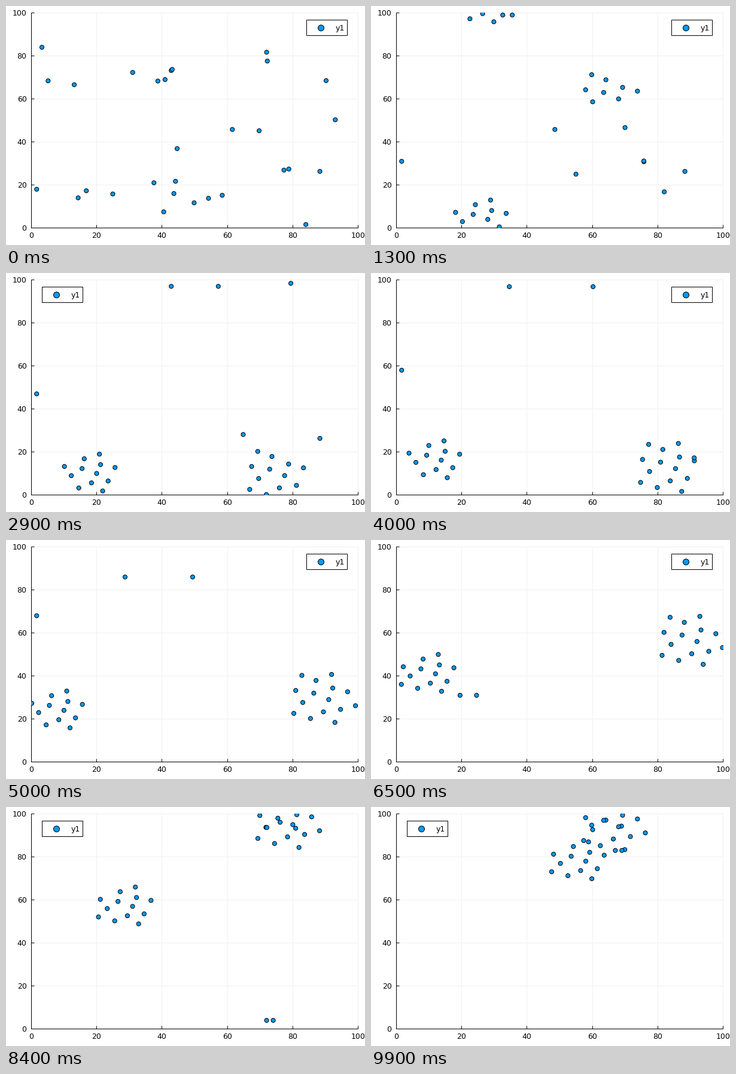
Write a matplotlib script that moves like this. It is 600 px wide and 400 px high and loops after 10 s.

```python
import numpy as np
import matplotlib.pyplot as plt
from matplotlib.animation import FuncAnimation
from matplotlib.patches import Circle, Rectangle

W, H, DPI = 600, 400, 100
FRAMES, INTERVAL = 100, 100
PX = 72 / DPI  # one pixel in points
LEFT, RIGHT, TOP, BOTTOM = 42.5, 588.5, 11.5, 371.5
BLUE = "#009afa"

plt.rcParams["font.family"] = "DejaVu Sans"
plt.rcParams["font.size"] = 9

# Steps at which the flock centres pass their key points
T = np.array([13, 29, 50, 65, 84, 99], float)


def path(points):
    """Smooth curve through one key point per time in T."""
    p = np.array(points, float)
    v = np.gradient(p, T, axis=0)

    def at(t):
        t = np.clip(t, T[0], T[-1])
        i = min(np.searchsorted(T, t, side="right") - 1, len(T) - 2)
        h = T[i + 1] - T[i]
        s = (t - T[i]) / h
        return ((1 + 2 * s) * (1 - s) ** 2 * p[i]
                + s * (1 - s) ** 2 * h * v[i]
                + s * s * (3 - 2 * s) * p[i + 1]
                + s * s * (s - 1) * h * v[i + 1])
    return at


def disc(n):
    """n evenly spread slots in the unit disc."""
    k = np.arange(n)
    r = np.sqrt((k + 0.5) / n)
    return np.column_stack([r * np.cos(2.4 * k), r * np.sin(2.4 * k)])


def birds(points, vel=(0, 0), join=(0, 13)):
    """Rows of x, y, vx, vy, first and last step of joining the flock."""
    return [(*p, *vel, *join) for p in points]


def flock(centre, slots, spread, members):
    m = np.array(members, float)
    start, vel, t0, t1 = m[:, :2], m[:, 2:4], m[:, 4:5], m[:, 5:6]

    def at(t):
        s = np.clip((t - t0) / (t1 - t0), 0, 1)
        s = s * s * (3 - 2 * s)
        goal = centre(t) + slots * spread(t)
        return (1 - s) * (start + vel * t) + s * goal
    return at


left_slots = disc(13)
left = flock(
    path([(26, 4), (18, 10), (8, 24), (10, 41), (29, 57), (56, 78)]),
    left_slots[np.argsort(left_slots[:, 0])],
    lambda t: 10,
    birds([(1.6, 18)], vel=(0, 1), join=(50, 65))
    + birds([(3.2, -16), (5.1, -31.6), (14.3, 14), (16.8, 17.3), (24.9, 15.8),
             (37.5, 21), (40.5, 7.5), (43.6, 16), (44.1, 21.7), (49.8, 11.7),
             (54.2, 13.8), (58.4, 15.2)]))

right_slots = disc(15)
right = flock(
    path([(66, 60), (75.5, 9), (89, 29), (90, 56), (78, 95), (66, 94)]),
    right_slots[np.argsort(-right_slots[:, 1])],
    lambda t: (11, 14),
    birds([(61.5, 45.8)], vel=(-1, 0), join=(13, 38))
    + birds([(72, 81.7), (42.8, 73.2), (43.1, 73.7), (93, 50.3), (72.2, 77.6),
             (90.2, 68.5), (40.9, 69), (38.7, 68.3)])
    + birds([(88.3, 26.3)], join=(29, 50))
    + birds([(69.7, 45.2), (77.3, 26.9), (78.8, 27.4)], join=(8, 29))
    + birds([(44.6, 36.9)], vel=(0.7, -1.25), join=(8, 29))
    + birds([(84, 1.6)], vel=(0, 0.75), join=(8, 29)))

# Two stragglers drift apart along the top, then dive together
pair = flock(
    path([(34, 99), (50, 97), (39, 86), (22, 31), (73, 4), (68, -17)]),
    np.array([(-1, 0), (1, 0)]),
    lambda t: 1 + 12 * np.exp(-((t - 42) / 16) ** 2),
    birds([(13.1, 66.6), (31, 72.3)]))


def swarm(t):
    """All dots: they bounce off three walls and wrap through the floor."""
    x, y = np.vstack([left(t), right(t), pair(t)]).T
    x = 100 - np.abs(100 - np.abs(x))
    y = 100 - np.abs(100 - y)
    return x, np.where(y < 0, y + 100, y)


def to_px(x, y):
    return (LEFT + (RIGHT - LEFT) * x / 100,
            BOTTOM - (BOTTOM - TOP) * y / 100)


fig = plt.figure(figsize=(W / DPI, H / DPI), dpi=DPI, facecolor="white")
ax = fig.add_axes([0, 0, 1, 1])
ax.set_xlim(0, W)
ax.set_ylim(H, 0)
ax.axis("off")


def line(xs, ys, color="black", z=2):
    ax.plot(xs, ys, color=color, lw=PX, zorder=z,
            solid_capstyle="butt", snap=False)


for v in range(0, 101, 20):
    x, y = to_px(v, v)
    x, y = np.floor(x) + 0.5, np.floor(y) + 0.5
    line([x, x], [TOP, BOTTOM], "#f0f0f0", 1)
    line([LEFT, RIGHT], [y, y], "#f0f0f0", 1)
    line([x, x], [BOTTOM, BOTTOM - 5])
    line([LEFT, LEFT + 5], [y, y])
    ax.text(x, 388, str(v), ha="center", va="baseline")
    ax.text(34.5, y + 4.5, str(v), ha="right", va="baseline")
line([LEFT, LEFT], [TOP, BOTTOM + 0.5])
line([LEFT, RIGHT + 0.5], [BOTTOM, BOTTOM])

x, y = to_px(*swarm(0))
dots = ax.scatter(x, y, s=(7 * PX) ** 2, c=[BLUE] * len(x),
                  edgecolors="black", linewidths=PX, zorder=3)
dots.set_clip_path(Rectangle((42, 11), 547, 361, transform=ax.transData))

box = Rectangle((0, 23.5), 68, 26, fc="white", ec="black", lw=PX,
                zorder=4, snap=False)
key = Circle((0, 36.8), 5, fc=BLUE, ec="black", lw=PX, zorder=5)
ax.add_patch(box)
ax.add_patch(key)
label = ax.text(0, 41, "y1", va="baseline", zorder=5)


def draw(n):
    x, y = swarm(n)
    dots.set_offsets(np.column_stack(to_px(x, y)))
    # the legend leaves the right corner when dots come near it
    crowded = np.any((x > 75) & (y > 80))
    x0 = 60.5 if crowded else 502.5
    box.set_x(x0)
    key.set_center((x0 + 24, 36.8))
    label.set_x(x0 + 48)
    return dots, box, key, label


anim = FuncAnimation(fig, draw, frames=FRAMES, interval=INTERVAL,
                     repeat=True, repeat_delay=0)
plt.show()
```
